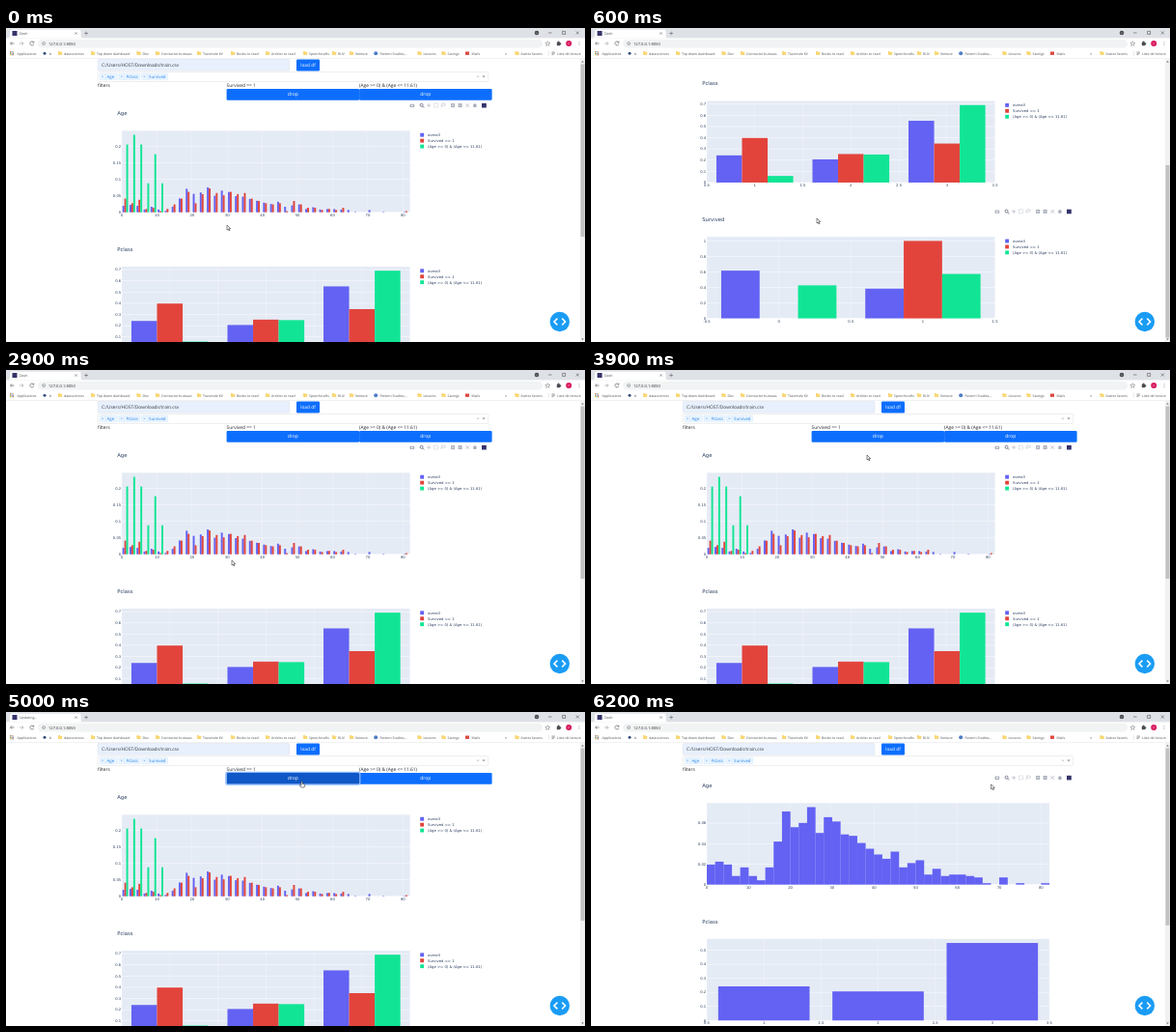
Write an HTML page that moves like this. It is 600 by 325 pixels and loops after 6300 ms.

```html
<!DOCTYPE html>
<html lang="en">
<head>
<meta charset="utf-8">
<title>Dashboard demo</title>
<style>
html, body { margin: 0; width: 100%; height: 100%; overflow: hidden; background: #fff; }
svg { display: block; width: 600px; height: 325px; }
text { text-rendering: geometricPrecision; white-space: pre; }
.ui { font-family: "Open Sans", "Noto Sans", sans-serif; }
.plot { font-family: "DejaVu Sans", sans-serif; fill: #2a3f5f; }
</style>
</head>
<body>
<svg id="stage" viewBox="0 0 600 325" xmlns="http://www.w3.org/2000/svg"></svg>
<script>
const LOOP = 6300, STEP = 100;
const BLUE = '#6362f3', RED = '#e2443c', GREEN = '#11e595', NAVY = '#34336b';
const AGE_FILTER = '(Age >= 0) & (Age <= 11.61)', SURVIVED_FILTER = 'Survived == 1';
const PLOT_LEFT = 120, PLOT_HEIGHT = 84.4, CHART_HEIGHT = 140.6, VIEW_TOP = 32;

// ---- data: passenger counts per bin ----
const allByTwo = [14, 16, 14, 6, 12, 6, 3, 12, 30, 51, 40, 43, 54, 36, 47, 44, 35, 34, 29, 25, 21,
  18, 23, 12, 15, 17, 7, 11, 6, 7, 7, 6, 5, 1, 0, 5, 0, 1, 0, 0, 1];
const survivedByTwo = [12, 8, 11, 3, 4, 1, 3, 7, 12, 18, 8, 16, 21, 17, 15, 18, 16, 17, 12, 10, 8,
  7, 8, 1, 10, 7, 4, 4, 2, 3, 2, 4];
survivedByTwo[40] = 1;
const childByTwo = [14, 16, 14, 6, 12, 6];
const allByFive = [24, 26, 19, 44, 118, 106, 109, 80, 59, 40, 38, 18, 18, 8, 5, 1, 1];
const childByFive = [24, 26, 18];
const share = counts => {
  const total = counts.reduce((a, b) => a + b, 0);
  return Array.from(counts, n => (n || 0) / total);
};
const pclass = [[216, 184, 491], [136, 87, 119], [4, 17, 47]].map(share);
const survived = [[549, 342], [0, 342], [29, 39]].map(share);

// ---- drawing helpers ----
const escapeText = s => s.replace(/&/g, '&amp;').replace(/</g, '&lt;');
const rect = (x, y, w, h, fill, extra = '') =>
  `<rect x="${x}" y="${y}" width="${w}" height="${h}" fill="${fill}" ${extra}/>`;
const circle = (x, y, r, fill) => `<circle cx="${x}" cy="${y}" r="${r}" fill="${fill}"/>`;
const line = (d, color, width = 0.6, fill = 'none') =>
  `<path d="${d}" fill="${fill}" stroke="${color}" stroke-width="${width}"/>`;
const text = (x, y, s, size, fill, anchor = 'start') =>
  `<text class="ui" x="${x}" y="${y}" font-size="${size}" fill="${fill}" text-anchor="${anchor}">${escapeText(s)}</text>`;
const plotText = (x, y, s, size = 3.75, anchor = 'start') =>
  `<text class="plot" x="${x}" y="${y}" font-size="${size}" text-anchor="${anchor}">${escapeText(String(s))}</text>`;
const cross = (x, y, r, color, width = 0.5) =>
  line(`M${x - r} ${y - r}l${2 * r} ${2 * r}m0 ${-2 * r}l${-2 * r} ${2 * r}`, color, width);
const ticks = (from, to, step) => {
  const out = [];
  for (let i = 0; from + i * step <= to + 1e-9; i++) out.push(+(from + i * step).toFixed(2));
  return out;
};

// ---- browser window ----
function folder(x) {
  return rect(x, 24.3, 1.9, 1.2, '#f0c64c') + rect(x, 24.8, 4.2, 3.3, '#f8d775', 'rx=".4"');
}

function browser(updating) {
  const ink = '#4b4f54';
  let s = rect(0, 0, 600, VIEW_TOP, '#fff') + rect(0, 0, 600, 10.4, '#dee1e6');
  s += '<path d="M2.5 10.4Q4 10 4 8V3.4Q4 1.8 5.6 1.8H76Q77.6 1.8 77.6 3.4V8Q77.6 10 79 10.4Z" fill="#fff"/>';
  s += rect(6.5, 3, 5, 5, NAVY) + text(14, 6.9, updating ? 'Updating...' : 'Dash', 3.6, ink);
  s += cross(72.5, 5.5, 1.1, ink) + line('M81.2 5.5h3.8m-1.9-1.9v3.8', ink, 0.5);
  s += circle(550, 5, 2.3, '#4a4d51') + line('M549.2 4.7l.8.8.8-.8', '#fff', 0.4);
  s += line('M562 5h3.6M576.6 3.4h3v3h-3z', '#222', 0.45) + cross(592.3, 5, 1.5, '#222', 0.45);

  s += line('M8.5 16h-4m1.7-1.7L4.5 16l1.7 1.7', ink) + line('M14 16h4m-1.7-1.7L18 16l-1.7 1.7', '#9a9da1');
  s += line('M28.5 14.8a2 2 0 1 0 .3 1.8M28.9 13.7v1.4h-1.5', ink);
  s += rect(33, 11.7, 523, 8.8, '#f1f3f4', 'rx="4.4"');
  s += line('M40.6 16a1.5 1.5 0 1 0-3 0 1.5 1.5 0 1 0 3 0M39.1 15.8v1', ink, 0.4);
  s += text(44, 17.6, '127.0.0.1:8050', 4.1, '#333');
  s += line('M561.3 13.7l.7 1.6 1.8.2-1.4 1.1.5 1.8-1.6-1-1.6 1 .5-1.8-1.4-1.1 1.8-.2z', ink, 0.4);
  s += rect(570.8, 14.6, 3.6, 3.6, '#4b4f54', 'rx=".4"') + circle(572.6, 14.4, 0.8, ink) + circle(574.6, 16.4, 0.8, ink);
  s += circle(583.2, 16, 3, '#d81b60') + text(583.2, 17.2, 'c', 3.4, '#fff', 'middle');
  for (const y of [14.4, 16, 17.6]) s += circle(594, y, 0.4, ink);

  const appColors = ['#e05a4d', '#4285d0', '#f1b83d', '#41a35b'];
  for (let i = 0; i < 9; i++) {
    s += rect(4 + i % 3 * 1.5, 24.2 + Math.floor(i / 3) * 1.5, 1.1, 1.1, appColors[i % 4]);
  }
  s += text(11.6, 27.7, 'Applications', 3.5, ink);
  s += circle(40, 26.2, 1.5, '#34507c') + text(45, 27.7, 'b', 3.5, ink);
  const bookmarks = [[60, 'datasciences'], [94, 'Top down dashboard'], [141.5, 'Dev'], [161, 'Contractor bureaus'],
    [204, 'Traversée KV'], [239, 'Books to read'], [275, 'Articles to read'], [314, 'Speechcrafts'], [344, 'RUV'],
    [362, 'Venture'], [432.5, 'Lessons'], [457.5, 'Savings'], [533.5, 'Autres favoris']];
  for (const [x, label] of bookmarks) s += folder(x - 6) + text(x, 27.7, label, 3.5, ink);
  s += circle(383.2, 26.2, 2, '#4f7cc4') + text(387.5, 27.7, 'Pattern Studies,...', 3.5, ink);
  s += rect(476, 24.5, 4, 3.4, '#dc4a3e') + text(482.5, 27.7, 'Mails', 3.5, ink);
  s += text(517, 27.8, '»', 4, ink) + rect(562, 23.5, 0.4, 5.4, '#ccc');
  s += line('M565.5 25h3.4m-3.4 1.3h3.4m-3.4 1.3h2', ink, 0.5) + text(571, 27.7, 'Liste de lecture', 3.5, ink);
  return s + rect(0, 31.5, 600, 0.4, '#dadce0');
}

// ---- page controls ----
function chip(x, w, label) {
  return rect(x, 47, w, 6.6, '#ebf5ff', 'rx=".6" stroke="#c2e0ff" stroke-width=".35"') +
    rect(x + 5.4, 47, 0.3, 6.6, '#c2e0ff') + cross(x + 2.8, 50.3, 0.8, '#3f94ec', 0.4) +
    text(x + 7.4, 51.9, label, 4.4, '#2384ea');
}

function dropButton(x, w, active, focused) {
  const ring = focused ? rect(x - 0.7, 62.3, w + 1.4, 12.9, 'none', 'rx="1.6" stroke="#86b6fe" stroke-width="1.3"') : '';
  return rect(x, 63, w, 11.7, active ? '#0f57c6' : '#0d6efd', 'rx="1.2"') + ring +
    text(x + w / 2, 70.4, 'drop', 5, '#fff', 'middle');
}

function controls(filters, hovered, focused) {
  let s = rect(95.2, 32.6, 198.6, 11.6, '#e8f0fe', 'rx="1" stroke="#ced4da" stroke-width=".35"');
  s += text(99, 40.2, 'C:/Users/HOST/Downloads/train.csv', 4.8, '#343a40');
  s += rect(301, 32.4, 24, 12, '#0d6efd', 'rx="1.2"') + text(313, 40.1, 'load df', 4.8, '#fff', 'middle');
  s += rect(95.2, 45.6, 404.6, 9.8, '#fff', 'rx="1.2" stroke="#ccc" stroke-width=".35"');
  s += chip(97.2, 18.2, 'Age') + chip(117, 22, 'Pclass') + chip(140.6, 27, 'Survived');
  s += cross(489, 50.3, 0.9, '#999', 0.45) + '<path d="M493.4 49.6h3.2l-1.6 1.7z" fill="#888"/>';
  s += text(95, 61, 'filters', 4.85, '#212529');
  const left = filters.length === 2 ? 228.6 : 297.2;
  const width = (503.6 - left) / filters.length;
  // the hovered button is painted last so its ring stays on top
  let top = '';
  filters.forEach((name, i) => {
    const x = left + i * width, active = hovered && i === 0;
    const button = dropButton(x, width, active, active && focused);
    s += text(x, 61, name, 4.85, '#212529');
    if (active) top = button; else s += button;
  });
  return s + top;
}

// ---- charts ----
function chart(top, spec) {
  const { title, series, names, min, max, xStep, xFirst, yStep, gap } = spec;
  const right = names.length > 1 ? 418.6 : 475;
  const plotTop = top + 31.25, bottom = plotTop + PLOT_HEIGHT;
  const yMax = Math.max(...series.flat()) / 0.95;
  const xAt = v => PLOT_LEFT + (v - min) / (max - min) * (right - PLOT_LEFT);
  const yAt = v => bottom - v / yMax * PLOT_HEIGHT;
  const colors = names.length === 3 ? [BLUE, RED, GREEN] : [BLUE, RED];

  let s = rect(PLOT_LEFT, plotTop, right - PLOT_LEFT, PLOT_HEIGHT, '#e5ebf5');
  s += plotText(115.2, top + 15, title, 5.3);
  for (const v of ticks(xFirst, max, xStep)) {
    s += rect(xAt(v) - 0.15, plotTop, 0.3, PLOT_HEIGHT, '#f4f7fb');
    s += plotText(xAt(v), bottom + 4, v, 3.75, 'middle');
  }
  for (const v of ticks(0, yMax, yStep)) {
    s += rect(PLOT_LEFT, yAt(v) - 0.2, right - PLOT_LEFT, 0.4, '#fff');
    s += plotText(119.2, yAt(v) + 1.3, v, 3.75, 'end');
  }
  const pitch = (right - PLOT_LEFT) / series[0].length;
  const barWidth = pitch * (1 - gap) / series.length;
  series.forEach((values, k) => values.forEach((v, i) => {
    if (v) s += rect(PLOT_LEFT + pitch * (i + gap / 2) + barWidth * k, yAt(v), barWidth + (gap ? 0 : 0.1), bottom - yAt(v), colors[k]);
  }));
  if (names.length > 1) names.forEach((name, k) => {
    const y = plotTop + 4.4 + k * 5.94;
    s += rect(429.2, y - 2, 3.9, 3.9, colors[k]) + plotText(437, y + 1.3, name);
  });
  return s;
}

function modebar(top) {
  const y = top + 5, gray = '#a9aeba';
  let s = rect(418.6, y - 1.4, 4.6, 3.3, gray, 'rx=".4"') + circle(420.9, y + 0.2, 0.9, '#fff');
  s += line(`M432.1 ${y - 0.3}a1.5 1.5 0 1 0-3 0a1.5 1.5 0 1 0 3 0M431.6 ${y + 0.8}l1.6 1.6`, '#5d6576', 0.8);
  s += line(`M435.9 ${y}h4.4M438.1 ${y - 2.2}v4.4`, gray);
  s += line(`M443.6 ${y - 2}h4v4h-4z`, gray, 0.5).replace('/>', ' stroke-dasharray="1 .5"/>');
  s += line(`M451.4 ${y + 2}q-.8-1.4 0-2.2q-1-1.8 2-1.9q2.8.2 1.8 1.8q-1 1.2-3.4.5`, gray, 0.5);
  s += rect(461.1, y - 2, 4, 4, gray) + line(`M461.9 ${y}h2.4m-1.2-1.2v2.4`, '#fff', 0.5);
  s += rect(468.6, y - 2, 4, 4, gray) + line(`M469.4 ${y}h2.4`, '#fff', 0.5);
  s += cross(478.3, y, 1.8, gray, 0.7);
  s += `<path d="M483.6 ${y}l2.3-2.1 2.3 2.1h-.7v1.9h-3.2v-1.9z" fill="${gray}"/>`;
  return s + rect(493, y - 2.2, 4.8, 4.6, NAVY);
}

// ---- dashboard for each set of active filters ----
function dashboard(stage) {
  const names = [['overall', SURVIVED_FILTER, AGE_FILTER], ['overall', AGE_FILTER], ['overall']][stage];
  const pick = s => [s, [s[0], s[2]], [s[0]]][stage];
  const pad = list => Array.from({ length: 41 }, (_, i) => list[i] || 0);
  const ages = [
    [allByTwo, survivedByTwo, childByTwo].map(c => pad(share(c))),
    [allByFive, childByFive].map(share),
    [share(allByTwo)]
  ][stage];
  const age = {
    title: 'Age', series: ages, names, xStep: 10, xFirst: 0,
    min: stage === 1 ? -2.5 : 0, max: stage === 1 ? 82.5 : 82,
    yStep: [0.05, 0.1, 0.02][stage], gap: stage === 2 ? 0 : 0.2
  };
  const classes = { title: 'Pclass', series: pick(pclass), names, min: 0.5, max: 3.5, xFirst: 0.5, xStep: 0.5, yStep: 0.1, gap: 0.2 };
  const outcome = { title: 'Survived', series: pick(survived), names, min: -0.5, max: 1.5, xFirst: -0.5, xStep: 0.5, yStep: 0.2, gap: 0.2 };
  return [age, classes, outcome];
}

function scrollbar(scroll, contentHeight) {
  const ratio = 283 / contentHeight;
  return rect(595, VIEW_TOP, 5, 293, '#f1f1f1') +
    rect(595.5, 37.5 + scroll * ratio, 4, 293 * ratio, '#c1c1c1') +
    '<path d="M596.2 35.6l1.3-1.5 1.3 1.5zM596.2 321.4l1.3 1.5 1.3-1.5z" fill="#666"/>';
}

function pointer(x, y, hand) {
  const d = hand
    ? 'M-.6 0Q0-.7.6 0V2.2L2.6 2.7Q3.2 3 3 4L2.5 6H-.9L-2.4 3.8Q-2.3 3-.6 3.9Z'
    : 'M0 0V5.1L1.2 4 2 5.9 2.9 5.5 2.1 3.7H3.7Z';
  return `<g transform="translate(${x} ${y})">${line(d, '#111', 0.5, '#fff')}</g>`;
}

// ---- motion ----
const scrollKeys = [[0, 0], [100, 20], [300, 100], [500, 165], [600, 171.4], [2300, 171.4], [2400, 150.6],
  [2700, 45], [2800, 14], [2900, 0]];
const xKeys = [[0, 229], [600, 234], [3000, 234], [3900, 286], [4200, 306.6], [5300, 306.6], [5700, 378.4], [5800, 378.4], [6200, 414.6]];
const yKeys = [[0, 204], [600, 197], [3000, 197], [3900, 88], [4200, 72], [5300, 72], [5700, 71], [5800, 71], [6200, 74.8]];

function at(keys, t) {
  const next = keys.findIndex(k => k[0] > t);
  if (next < 0) return keys[keys.length - 1][1];
  const [t0, a] = keys[next - 1], [t1, b] = keys[next];
  return a + (b - a) * (t - t0) / (t1 - t0);
}

function draw(t) {
  const stage = t < 5300 ? 0 : t < 6000 ? 1 : 2;
  const filters = [[SURVIVED_FILTER, AGE_FILTER], [AGE_FILTER], []][stage];
  const scroll = at(scrollKeys, t), x = at(xKeys, t), y = at(yKeys, t);
  const hovered = stage < 2 && scroll === 0 && y > 63 && y < 74.7;
  const focused = t >= 4300 && t < 5300 || t >= 5700;
  const updating = t >= 4300 && t < 5300;
  const firstTop = stage === 2 ? 63 : 75.1;

  let page = controls(filters, hovered, focused);
  dashboard(stage).forEach((spec, i) => {
    const top = firstTop + i * CHART_HEIGHT, pointerY = y + scroll;
    page += chart(top, spec);
    if (!hovered && pointerY >= top && pointerY < top + CHART_HEIGHT) page += modebar(top);
  });
  document.getElementById('stage').innerHTML =
    rect(0, 0, 600, 325, '#fff') +
    `<g transform="translate(0 ${-scroll})">${page}</g>` +
    browser(updating) + scrollbar(scroll, stage === 2 ? 452.3 : 464.4) +
    circle(573.8, 304, 10.2, '#1a9cf5') +
    line('M571.4 300.6L568 304l3.4 3.4M576.2 300.6L579.6 304l-3.4 3.4', '#fff', 1.5) +
    pointer(x, y, hovered);
}

const start = performance.now();
let shown = -1;
function tick() {
  const t = Math.floor((performance.now() - start) % LOOP / STEP) * STEP;
  if (t !== shown) draw(shown = t);
  requestAnimationFrame(tick);
}
tick();
</script>
</body>
</html>
```
